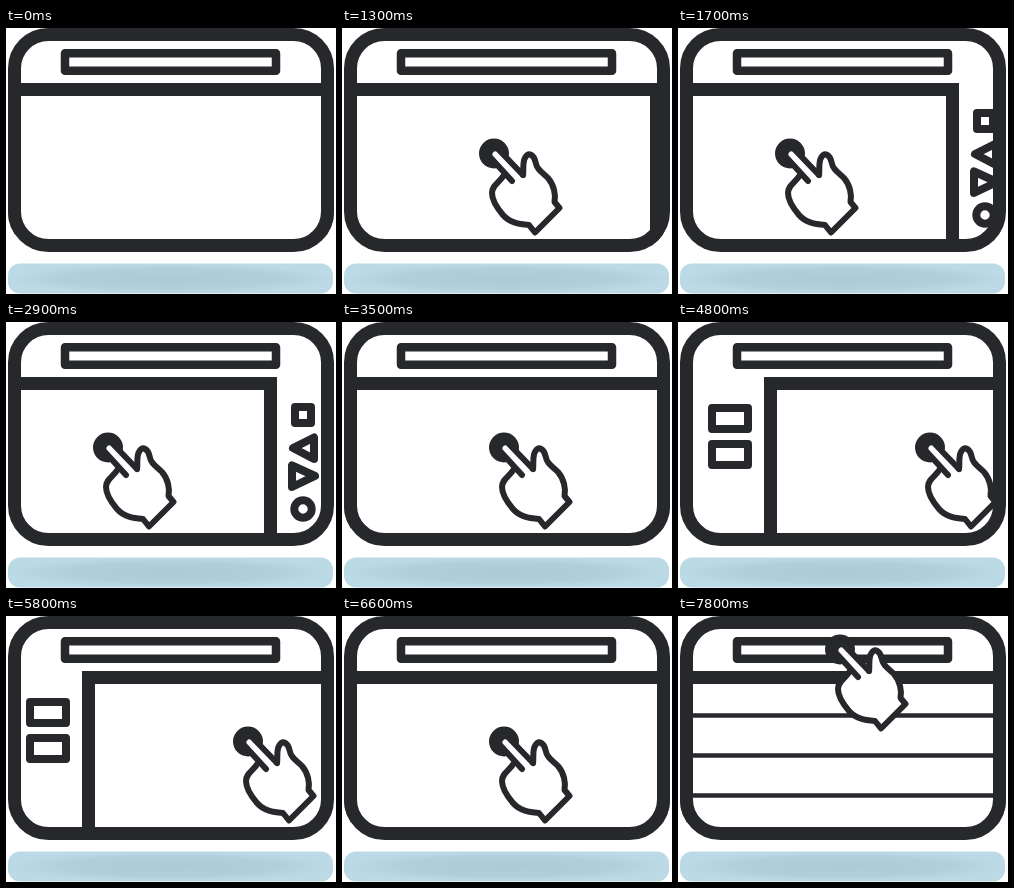
An HTML page for the animation above (8000 ms loop, 330 px wide and 266 px high).

```html
<!DOCTYPE html>
<html lang="en">
<head>
<meta charset="utf-8">
<title>Swipe gestures</title>
<style>
  html, body { margin: 0; width: 100%; height: 100%; overflow: hidden; background: #fff; }
  svg { display: block; width: 100%; height: 100%; }
  .line { fill: none; stroke: #26282b; }
  .icons { stroke-width: 8; stroke-linejoin: round; }
  .solid { fill: #26282b; }

  .drag, .travel, .press, .list { animation: 8s step-end infinite; }
  .drag { animation-name: drag; }
  .travel { animation-name: travel; }
  .press { animation-name: press; }
  .list { animation-name: list; }

  /* Swipe left and back, then right and back, 10px per 100ms */
  @keyframes drag {
    0% { transform: translateX(0); }
    16.25% { transform: translateX(0); animation-timing-function: steps(7, start); }
    25% { transform: translateX(-70px); }
    36.25% { transform: translateX(-70px); animation-timing-function: steps(7, start); }
    45% { transform: translateX(0); }
    50% { transform: translateX(0); animation-timing-function: steps(9, start); }
    61.25% { transform: translateX(90px); }
    72.5% { transform: translateX(90px); animation-timing-function: steps(9, start); }
    83.75%, 100% { transform: translateX(0); }
  }
  @keyframes travel {
    0% { transform: translateY(-300px); }
    6.25% { transform: translateY(-150px); }
    7.5% { transform: translateY(-100px); }
    8.75% { transform: translateY(-50px); }
    10% { transform: translateY(0); }
    88.75% { transform: translateY(-31px); }
    90% { transform: translateY(-61px); }
    91.25%, 100% { transform: translateY(-92px); }
  }
  @keyframes press {
    0% { opacity: 0; }
    10% { opacity: 1; }
    88.75% { opacity: 0; }
    97.5%, 100% { opacity: 1; }
  }
  @keyframes list {
    0% { opacity: 0; }
    97.5%, 100% { opacity: 1; }
  }
</style>
</head>
<body>
<svg viewBox="0 0 330 266">
  <defs>
    <clipPath id="screen"><rect x="2" y="0" width="326" height="224" rx="40"/></clipPath>
    <radialGradient id="shade">
      <stop offset="0" stop-color="#abcad5"/>
      <stop offset=".65" stop-color="#b0cfda"/>
      <stop offset="1" stop-color="#bbdae5"/>
    </radialGradient>
  </defs>

  <rect x="2" y="235.5" width="325" height="30" rx="12" fill="url(#shade)"/>

  <g clip-path="url(#screen)">
    <g class="drag">
      <rect class="line" x="2.5" y="61.5" width="322" height="200" stroke-width="13"/>
      <g class="line icons">
        <path d="M-56 86h36v21h-36zM-56 122h36v21h-36z"/>
        <path d="M349 85h16v16h-16z"/>
        <path d="M347 126L368 115.500V137z"/>
        <path d="M346 143.500V165L369 154z"/>
        <circle cx="357" cy="187" r="8.700"/>
      </g>
    </g>
    <path class="line list" stroke-width="4.500" d="M15 99.500H315M15 139.500H315M15 179.500H315"/>
  </g>

  <rect class="line" x="8.500" y="6.500" width="313" height="211" rx="34" stroke-width="13"/>
  <rect class="line" x="59" y="25.250" width="211" height="17.500" stroke-width="8.500" stroke-linejoin="round"/>

  <g class="drag">
    <g class="travel">
      <circle class="solid press" cx="162" cy="125.500" r="15"/>
      <g class="line" stroke-width="6" stroke-linejoin="round" stroke-linecap="round">
        <path fill="#fff" d="M172 147C168 154 160 157 160 165C160 173 165 180 171 187C178 195 187 196 197 197L203 204.500L227.500 180L222.500 174C224 167 222 157 216 150C210 144 205 142 203.500 134C202 127 197 124 193.500 129C190 134 192 141 191 147L180 140z" style="fill:#fff"/>
        <path style="fill:#fff" d="M180 153L158 129A6 6 0 0 1 166 121L191 147"/>
      </g>
    </g>
  </g>
</svg>
</body>
</html>
```
